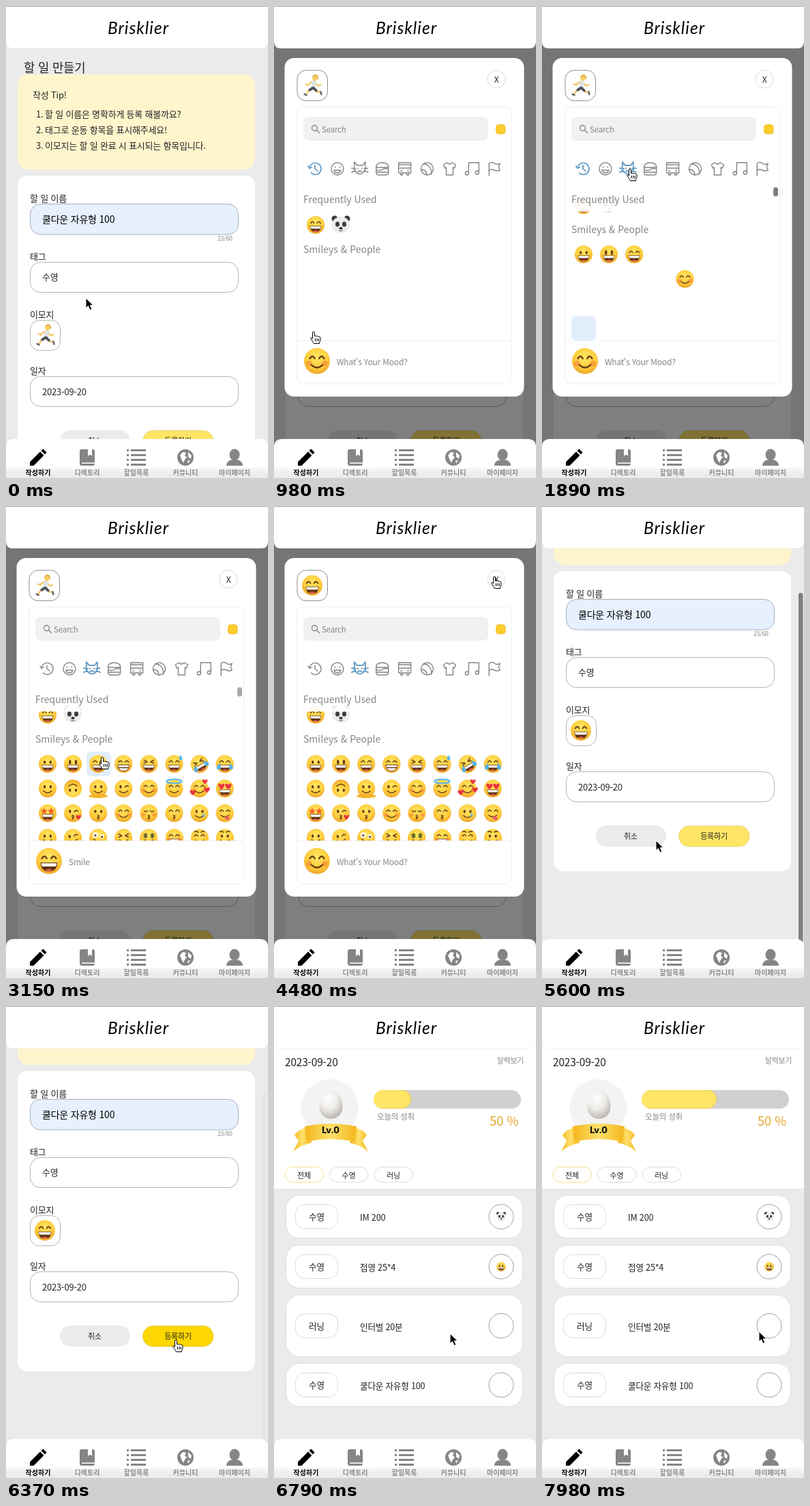
Write an HTML page that moves like this. It is 384x690 px and loops after 8 s.

```html
<!DOCTYPE html>
<html lang="ko">
<head>
<meta charset="utf-8">
<title>할 일 만들기</title>
<style>
html, body { margin: 0; width: 100%; height: 100%; overflow: hidden; background: #ebebeb; }
svg { display: block; }
text { font: 13px "Noto Sans CJK KR", "Noto Sans CJK", "Noto Sans", sans-serif; letter-spacing: -.2px; fill: #222; dominant-baseline: central; transform: translateY(-.5px); }
.mid { text-anchor: middle; }
.logo { font: italic 400 24.5px Lato, sans-serif; letter-spacing: 1px; fill: #000; }
.head { font-size: 14px; font-weight: 500; letter-spacing: 0; fill: #858585; }
.grey { fill: #858585; }
.field { fill: #fff; stroke: #b4b4b4; }
.line { fill: none; stroke: #858585; stroke-width: 1.4; stroke-linecap: round; stroke-linejoin: round; }
.blue .line { stroke: #5a9fd2; }
.ink { fill: none; stroke: #6a3b12; stroke-width: 1.6; stroke-linecap: round; stroke-linejoin: round; }
.dark { fill: #5d3211; }
.hot { fill: #e2eefc; }
.tab text { font-size: 10px; font-weight: 700; letter-spacing: 0; fill: #8a8a8a; }
.tab { fill: #858585; }
.tab.on, .tab.on text { fill: #000; }

#page, #thumb, #cursor, #list, #send, #fill, #knob { animation: 8s linear infinite; }
#page { animation-name: page; }
#thumb { animation-name: thumb; }
#cursor { animation-name: cursor; }
#list { animation-name: list; }
#send { animation-name: send; }
#fill { animation-name: fill; }
#knob { animation-name: knob; }
@keyframes page {
  0%, 66.5% { transform: translateY(0); animation-timing-function: ease-out; }
  69.9%, 100% { transform: translateY(-153px); }
}
@keyframes thumb {
  0%, 66.5% { transform: translateY(0); opacity: 0; animation-timing-function: ease-out; }
  67.3% { opacity: 1; }
  69.9% { transform: translateY(125px); }
  77% { opacity: 1; }
  79.6% { opacity: .05; }
  83.1%, 100% { transform: translateY(125px); opacity: 0; }
}
@keyframes list {
  0%, 15.7% { transform: translateY(29px); }
  17.5%, 26.25% { transform: translateY(0); }
  33.2%, 100% { transform: translateY(14px); }
}
@keyframes knob {
  0%, 15.7% { opacity: 0; }
  15.75%, 38.5% { opacity: 1; }
  39.375% { opacity: .68; }
  41.125%, 100% { opacity: 0; }
}
@keyframes send {
  0%, 73.5% { fill: #ffe566; }
  75.2%, 100% { fill: #ffd700; }
}
@keyframes fill {
  0%, 83.1% { transform: translateX(-110px); animation-timing-function: ease; }
  89.2%, 100% { transform: translateX(0); }
}
@keyframes cursor {
  0%, .4% { transform: translate(117px, 427px); }
  2.6%, 4.4% { transform: translate(106px, 454px); }
  8.7%, 18% { transform: translate(58px, 476px); animation-timing-function: ease-in-out; }
  23.6%, 26.25% { transform: translate(129px, 238px); animation-timing-function: ease-in-out; }
  35.8%, 42% { transform: translate(141px, 367px); animation-timing-function: ease-in-out; }
  50.7%, 57% { transform: translate(323px, 103px); animation-timing-function: ease-in-out; }
  63.8%, 70.1% { transform: translate(167px, 489px); animation-timing-function: ease-in-out; }
  75.2%, 83.1% { transform: translate(249px, 488px); animation-timing-function: ease-in-out; }
  89.2%, 96.3% { transform: translate(300px, 437px); }
  99.7%, 100% { transform: translate(318px, 476px); }
}
</style>
</head>
<body>
<svg width="384" height="690" viewBox="0 0 384 690">
  <defs>
    <radialGradient id="skin" cx=".5" cy=".35" r=".68">
      <stop offset="0" stop-color="#ffe763"/><stop offset=".65" stop-color="#fdcb3a"/><stop offset="1" stop-color="#eb9d24"/>
    </radialGradient>
    <radialGradient id="egg" cx=".4" cy=".3" r=".75">
      <stop offset="0" stop-color="#fff"/><stop offset=".5" stop-color="#eeece8"/><stop offset="1" stop-color="#b5b1aa"/>
    </radialGradient>
    <linearGradient id="gold">
      <stop offset="0" stop-color="#f3b51c"/><stop offset=".5" stop-color="#ffe06a"/><stop offset="1" stop-color="#f3b51c"/>
    </linearGradient>
    <linearGradient id="foot" x2="0" y2="1">
      <stop offset="0" stop-opacity=".03"/><stop offset=".6" stop-opacity=".07"/><stop offset="1" stop-opacity=".08"/>
    </linearGradient>
    <clipPath id="body"><rect x="34" y="260" width="314" height="229"/></clipPath>
    <clipPath id="bar"><rect x="146" y="123" width="216" height="27" rx="13.5"/></clipPath>
    <g id="runner" fill="none" stroke-linecap="round" stroke-linejoin="round" transform="scale(.95)">
      <path d="M2-5Q-5-5-6 0L-10-2M4-4L9 1 13-1" stroke="#efc25a" stroke-width="2.2"/>
      <path d="M0 6L-6 8-9 14M3 5L8 10 13 10" stroke="#efc25a" stroke-width="2.4"/>
      <path d="M-9 15l-3-1.500M13 10l1 4" stroke="#4b4f57" stroke-width="2.4"/>
      <path d="M3-5L1 2" stroke="#dfe3e6" stroke-width="6.500"/>
      <path d="M1 4L-4 7M2 4l4 4" stroke="#4a4d55" stroke-width="4"/>
      <circle cx="4" cy="-11" r="3.900" fill="#f8cf62"/>
      <path d="M1-13q2-3.500 5-2.500t2.500 5" stroke="#dcab35" stroke-width="1.800"/>
    </g>
  </defs>

  <rect width="384" height="690" fill="#ebebeb"/>

  <g id="page">
    <text x="26" y="89" style="font-size:17.8px">할 일 만들기</text>
    <rect x="17" y="100" width="348" height="139" rx="16" fill="#fff5cd"/>
    <text x="39" y="130">작성 Tip!</text>
    <text x="44" y="158">1.</text><text x="57" y="157.500">할 일 이름은 명확하게 등록 해볼까요?</text>
    <text x="44" y="181">2.</text><text x="57" y="181">태그로 운동 항목을 표시해주세요!</text>
    <text x="44" y="204">3.</text><text x="57" y="204">이모지는 할 일 완료 시 표시되는 항목입니다.</text>
    <rect x="17" y="248" width="348" height="439" rx="14" fill="#fff"/>
    <text x="35" y="281">할 일 이름</text>
    <rect class="field" x="35.500" y="289.500" width="305" height="44.500" rx="15" style="fill:#e6f0ff;stroke:#a6adba"/>
    <text x="53" y="311" style="font-size:14px;font-weight:500;fill:#000">쿨다운 자유형 100</text>
    <text class="grey" x="310" y="340" style="font-size:8.7px">23/60</text>
    <text x="35" y="366">태그</text>
    <rect class="field" x="35.500" y="374.500" width="305" height="44" rx="15"/>
    <text x="53" y="396">수영</text>
    <text x="35" y="451">이모지</text>
    <rect class="field" x="35.500" y="459.500" width="44" height="44" rx="13"/>
    <g transform="translate(57 481)">
      <use href="#runner" data-show="0-3290"/>
      <g data-show="3290-8000"><g data-face="up open" transform="scale(1.15)"/></g>
    </g>
    <text x="35" y="533">일자</text>
    <rect class="field" x="35.500" y="541.500" width="305" height="44" rx="15"/>
    <text x="53" y="564">2023-09-20</text>
    <rect x="79" y="620" width="103" height="31" rx="15.500" fill="#ebebeb"/>
    <text class="mid" x="130" y="635" style="font-size:11px">취소</text>
    <rect id="send" x="200.500" y="620.500" width="103.500" height="30.500" rx="15" stroke="#000" stroke-opacity=".1"/>
    <text class="mid" x="252" y="635" style="font-size:11px">등록하기</text>
  </g>
  <rect id="thumb" x="376" y="2" width="6.500" height="563" rx="3.200" fill="#7f7f7f"/>

  <g data-show="980-4620">
    <rect width="384" height="690" opacity=".5"/>
    <rect x="15.500" y="76" width="351" height="495" rx="14" fill="#fff"/>
    <rect class="field" x="34" y="94" width="44.500" height="44.500" rx="13" style="stroke:#8e8e8e"/>
    <g transform="translate(56 116)">
      <use href="#runner" data-show="0-3290"/>
      <g data-show="3290-8000"><g data-face="up open" transform="scale(1.15)"/></g>
    </g>
    <circle cx="326" cy="107" r="13" fill="#fff" stroke="#ddd"/>
    <text class="mid" x="326" y="107" style="font-size:12px">X</text>
    <rect x="33.500" y="147.500" width="315" height="405" rx="8" fill="#fff" stroke="#efefef"/>
    <rect x="43" y="162" width="271" height="35" rx="8" fill="#f2f1ef"/>
    <g class="line"><circle cx="59.500" cy="178.500" r="4"/><path d="M62.500 181.500l4 4"/></g>
    <text class="grey" x="70" y="180" style="font-size:11.500px">Search</text>
    <rect x="325.500" y="173.500" width="13.500" height="13.500" rx="4" fill="#ffcd2c" stroke="#e9b71c" stroke-width=".8"/>
    <g id="cats"></g>
    <g clip-path="url(#body)">
      <g id="list">
        <rect class="hot" x="43" y="453" width="36" height="36" rx="7" data-show="1400-2100"/>
        <rect class="hot" x="118" y="345" width="36" height="36" rx="7" data-show="2800-4480"/>
        <g data-face="up open" transform="translate(61 291)"/>
        <g data-face="panda" transform="translate(98 291)"/>
        <text class="head" x="43" y="326">Smileys &amp; People</text>
      </g>
      <rect x="34" y="260" width="304" height="40.500" fill="#fff" opacity=".93"/>
    </g>
    <text class="head" x="43" y="282">Frequently Used</text>
    <rect id="knob" x="339" y="265" width="7" height="13.500" rx="3.500" fill="#7f7f7f"/>
    <path d="M34 489.500H348" stroke="#efefef"/>
    <g data-show="0-2800 3500-8000">
      <g data-face="up smile blush" transform="translate(63 519) scale(1.46)"/>
      <text class="grey" x="92" y="520" style="font-size:12px">What's Your Mood?</text>
    </g>
    <g data-show="2800-3500">
      <g data-face="up open" transform="translate(63 519) scale(1.46)"/>
      <text class="grey" x="92" y="520" style="font-size:12px">Smile</text>
    </g>
  </g>

  <g data-show="6650-8000">
    <rect width="384" height="690" fill="#ebebeb"/>
    <rect width="384" height="267" fill="#fff"/>
    <text x="16" y="81" style="font-size:15.500px">2023-09-20</text>
    <text class="grey" x="327" y="79" style="font-size:10.800px">달력보기</text>
    <circle cx="82" cy="149" r="42" fill="#f3f3f3"/>
    <path d="M83.500 123c9 0 17 13 17 24s-8 18-17 18-17-7-17-18 8-24 17-24z" fill="url(#egg)"/>
    <g fill="url(#gold)">
      <path id="tail" d="M50 177q-15 3-20 12l6 8-8 16q9-9 27-13z"/>
      <use href="#tail" transform="matrix(-1 0 0 1 166 0)"/>
      <path d="M45 176q38-8 76 0l-3 22q-35-7-70 0z"/>
    </g>
    <text class="mid" x="83" y="182" style="font:800 12.500px Inter,sans-serif;fill:#111">Lv.0</text>
    <g clip-path="url(#bar)">
      <rect x="146" y="123" width="216" height="27" fill="#d0d0d0"/>
      <rect id="fill" x="140" y="123" width="115.500" height="26.500" rx="13" fill="#ffe566" stroke="#ecc94a"/>
    </g>
    <text class="grey" x="151" y="161" style="font-size:11.500px">오늘의 성취</text>
    <text x="358" y="167" text-anchor="end" style="font-size:18.500px;fill:#e3a52d">50 %</text>
    <g id="todo"></g>
  </g>

  <path d="M0 0H384V52q0 10-10 10H10Q0 62 0 52z" fill="#fff"/>
  <path d="M0 52q0 10 10 10H374q10 0 10-10" fill="none" stroke="#000" stroke-opacity=".05"/>
  <rect width="384" height="1" fill="#a8a8a8"/>
  <text class="logo mid" x="194" y="32">Brisklier</text>

  <path d="M0 690V645q0-12 12-12H372q12 0 12 12v45z" fill="#fff"/>
  <rect y="675" width="384" height="15" fill="url(#foot)"/>
  <g id="tabs"></g>

  <g id="cursor">
    <path data-show="0-630 3430-4060 4620-5950 6650-8000" d="M0 0v14.500l3.400-3 2.700 6 2.800-1.200-2.600-5.800h4.600z" stroke="#fff"/>
    <path data-show="630-3430 4060-4620 5950-6650" d="M-1.500 1q1.500-2 3 0v5.500q2-1 3 .4 2-.8 2.800 .5 2.400-.5 2.700 1.500v3q0 2-1.500 4v1.600H.5Q-1 15-4.500 9.500q.5-2 3 .6zM2.500 10v4M5 10v4M7.300 10v4" fill="#fff" stroke="#000" stroke-linejoin="round"/>
  </g>
</svg>
<script>
const add = (id, html) => document.getElementById(id).insertAdjacentHTML('beforeend', html);
const at = (x, y, html, more = '') => `<g transform="translate(${x} ${y})" ${more}>${html}</g>`;
const pair = s => s + `<g transform="scale(-1 1)">${s}</g>`;
const ink = d => `<path class="ink" d="${d}"/>`;
const shape = (d, fill) => `<path d="${d}" fill="${fill}"/>`;
const heart = (x, y, k) => `<path transform="translate(${x} ${y}) scale(${k})" d="M0 4Q-5 0-4-3-2-5 0-2 2-5 4-3 5 0 0 4z" fill="#e9323f"/>`;
const eye = (ry, x = 4.3) => `<ellipse class="dark" cx="${x}" cy="-2.500" rx="1.600" ry="${ry}"/>`;
const jaw = 'M-8.500 1.500H8.500Q8 10.500 0 10.500T-8.500 1.500z';

// Pieces of a face with radius 13
const parts = {
  dot: pair(eye(2.2)), tall: pair(eye(3.4)),
  up: pair(ink('M2.200-2.500q2.300-4.500 5 0')),
  shut: pair(ink('M2-3.500q2.300 3 4.800 0')),
  squint: pair(ink('M7-5.500L2.500-3 7-1')),
  wink: eye(2.4, -4.3) + ink('M2-2q2.300-3 5-1'),
  zany: '<circle cx="-5" cy="-3" r="4" fill="#fff"/><circle cx="5" cy="-3" r="3" fill="#fff"/>' + pair(eye(1.6, 5)),
  love: heart(-5, -3, 1.1) + heart(5, -3, 1.1),
  star: pair(shape('M5-8l1.500 3.200 3.500.4-2.600 2.400.7 3.500L5-.2 1.900 1.500l.7-3.500L0-4.400l3.500-.4z', '#f4622c')),
  cash: pair('<ellipse cx="5" cy="-3" rx="3" ry="3.600" fill="#6f8f3a"/>') + pair(ink('M5-6v6')),
  open: shape(jaw, '#5d3211') + shape('M-7.800 2.200H7.800Q7.500 4.500 6.800 5.500H-6.800Q-7.500 4.500-7.800 2.200z', '#fff') +
    shape('M-4 9.300q4-3 8 0-2 1.200-4 1.200t-4-1.200z', '#dd5a50'),
  grin: `<path d="${jaw}" fill="#fff" stroke="#6a3b12"/>` + ink('M-7 5.500H7'),
  smile: ink('M-6 3.500q6 6 12 0'),
  kiss: ink('M-1 3q4 1 0 2.800 4 1 0 2.800'),
  tongue: ink('M-6 3q6 5 12 0') + shape('M0 5.500l5-1.500q3 6-1 6T0 5.500z', '#ea5a68'),
  blush: pair('<circle cx="8" cy="2.500" r="2.800" fill="#f2793a" opacity=".55"/>'),
  tears: pair(shape('M7-1q5 3 5 8-4 3-6-1z', '#4fb2ee')),
  tear: shape('M6 0q3 4 0 6-3-2 0-6z', '#4fb2ee'),
  sweat: shape('M9-13q5 6 1 8-5-1-1-8z', '#4fb2ee'),
  halo: '<ellipse cy="-10.500" rx="11" ry="3" fill="none" stroke="#55b4ea" stroke-width="2.200"/>',
  hearts: heart(-10, 6, 1) + heart(11, 2, 1) + heart(8, -10, .9),
  lips: heart(8, 6, .9),
  brow: pair(ink('M2-8q2-2 5-1')),
  melt: '<ellipse cy="11" rx="14" ry="3" fill="#f5b32b"/>',
  panda: pair('<circle cx="9" cy="-9" r="4.500" fill="#3c3c3f"/>') + '<ellipse rx="13" ry="12" fill="#ececee"/>' +
    pair('<ellipse cx="5" cy="-1" rx="3" ry="3.800" fill="#3c3c3f"/>') + '<ellipse cy="5" rx="2.600" ry="1.800" fill="#222"/>' +
    '<path d="M-3 8q3 2 6 0" stroke="#555" fill="none"/>'
};
const face = spec => {
  const words = spec.split(' ');
  const turn = words.find(w => w[0] === '@');
  const skin = spec === 'panda' ? '' : '<circle r="13" fill="url(#skin)"/>';
  return `<g transform="rotate(${turn ? turn.slice(1) : 0})">${skin}${words.map(w => parts[w] || '').join('')}</g>`;
};

const grid = ('dot open,tall open,up open,up grin,squint open,up open sweat,squint open tears @-30,up open tears,' +
  'dot smile,dot smile @180,dot smile melt,wink smile,up smile blush,up smile halo,up smile blush hearts,love open,' +
  'star open,wink kiss lips,dot kiss,up smile blush,shut kiss blush,up kiss,dot smile tear,up tongue,' +
  'dot tongue,wink tongue @-10,zany tongue @12,squint tongue,cash tongue,up open blush,up smile brow,dot smile brow').split(',');
const early = [0, 1, 2, 12];
grid.forEach((spec, i) => {
  const start = early.includes(i) ? 1540 : i < 16 ? 1960 : 2100;
  add('list', at(61 + i % 8 * 37.1, 363 + (i >> 3) * 36, face(spec), `data-show="${start}-8000"`));
});
document.querySelectorAll('[data-face]').forEach(el => { el.innerHTML = face(el.dataset.face); });

const ring = (x, y, r) => `M${x - r} ${y}a${r} ${r} 0 1 0 ${2 * r} 0a${r} ${r} 0 1 0 ${-2 * r} 0`;
const cats = [
  'M-8-1a8.500 8.500 0 1 1 2.500 7M-10-4l2 3.500 3.500-2M0-5v5l4 3',
  ring(0, 0, 9) + 'M-3.500-3v1M3.500-3v1M-5 2H5Q4 6 0 6T-5 2',
  'M-8-10l4 5h8l4-5v12q-8 11-16 0zM-12-1l6 1M-12 5l6-2M12-1l-6 1M12 5l-6-2M-3-1v1M3-1v1M-3 4l3-1 3 1',
  'M-9-2q0-7 9-7t9 7zM-9 5H9q0 4-4 4H-5q-4 0-4-4zM-9-2v7M9-2v7M-9 1q4.500 3 9 0t9 0',
  'M-9-9H9V6H-9zM-9-1H9M-9-6H9M-6 6v3h3v-3M3 6v3h3v-3M-6 3h2M4 3h2',
  ring(0, 0, 9) + 'M-6-7q7 0 10 5t2 10M-9 1q5 0 7 3t1 5',
  'M-4-9l-5 3 2 5 2-1v11H5v-11l2 1 2-5-5-3q-4 4-8 0z',
  'M-5 6v-15H10V5' + ring(-7.5, 6.5, 2.5) + ring(7.5, 5.5, 2.5),
  'M-8 10v-18q4-3 8 0t8 0l-2 5 2 5q-4 2-8 0t-8 0'
];
const lit = { 0: '980-2030', 2: '1820-8000' };
cats.forEach((d, i) => {
  const path = `<path class="line" d="${d}"/>`;
  add('cats', at(60 + i * 32.9, 238, path + (lit[i] ? `<g class="blue" data-show="${lit[i]}">${path}</g>` : '')));
});

['전체', '수영', '러닝'].forEach((name, i) => {
  const x = 16 + i * 65.5;
  add('todo', `<rect x="${x}" y="235.500" width="56.500" height="22" rx="11" fill="#fff" stroke="${i ? '#ddd' : '#f3e28e'}"/>
    <text class="mid" x="${x + 28}" y="247" style="font-size:11px">${name}</text>`);
});
[['수영', 'IM 200', 276, 64, 'panda'], ['수영', '접영 25*4', 349, 64, 'tall open'],
 ['러닝', '인터벌 20분', 422, 91], ['수영', '쿨다운 자유형 100', 522, 64]].forEach(([tag, name, y, h, mood]) => {
  const mid = y + h / 2;
  add('todo', `<rect x="17.500" y="${y + .5}" width="347" height="${h - 1}" rx="20" fill="#fff" stroke="#dedede"/>
    <rect x="31.500" y="${mid - 17.5}" width="62" height="35" rx="13" fill="#fff" stroke="#dcdcdc"/>
    <text class="mid" x="62.500" y="${mid}" style="font-size:12.600px">${tag}</text>
    <text x="126" y="${mid + 1}" style="font-size:12.600px">${name}</text>
    <circle cx="333" cy="${mid}" r="18" fill="#fff" stroke="#a0a0a0"/>
    ${mood ? at(333, mid, `<g transform="scale(.52)">${face(mood)}</g>`) : ''}`);
});

const tabs = [
  ['작성하기', '<path d="M-12 12V6.500L3-8.500 8.500-3-6.500 12zM4.500-10l3-2.500 5 5L10-4.500z"/>'],
  ['디렉토리', '<path d="M-8-12H8q3 0 3 3V9q0 3-3 3H-8q-3 0-3-3V-9q0-3 3-3z"/><path d="M1-12H7V-2L4-4.500 1-2zM-8 7.500H11V9H-8z" fill="#fff"/>'],
  ['할일목록', [-10.5, -3.5, 3.5, 10.5].map(y => `<path d="M-14 ${y - 1.5}h3v3h-3zM-8 ${y - 1.5}H14v3H-8z"/>`).join('')],
  ['커뮤니티', '<circle r="12"/><path d="M-8-3l4-5 5 1-2 4 3 3-3 3-2 5-3-6zM4-8l5 5-1 5-4-3zM3 5l4-1-3 5z" fill="#fff"/>'],
  ['마이페이지', '<ellipse cy="-4" rx="7.500" ry="8.500"/><path d="M-12 12Q-12 5-4 3.500H4Q12 5 12 12z"/>']
];
tabs.forEach(([name, icon], i) => {
  add('tabs', `<g class="tab ${i ? '' : 'on'}">${at(47 + i * 72, 660, icon)}<text class="mid" x="${47 + i * 72}" y="682">${name}</text></g>`);
});

// data-show="from-to ..." (ms) becomes a stepped keyframe rule
let rules = '';
document.querySelectorAll('[data-show]').forEach((el, i) => {
  const steps = el.dataset.show.split(' ').map(span => {
    const [from, to] = span.split('-').map(ms => ms / 80);
    return `${from}%{opacity:1}${to}%{opacity:0}`;
  });
  rules += `@keyframes show${i}{0%{opacity:0}${steps.join('')}}`;
  el.style.animation = `show${i} 8s step-end infinite`;
});
document.head.appendChild(document.createElement('style')).textContent = rules;
</script>
</body>
</html>
```
